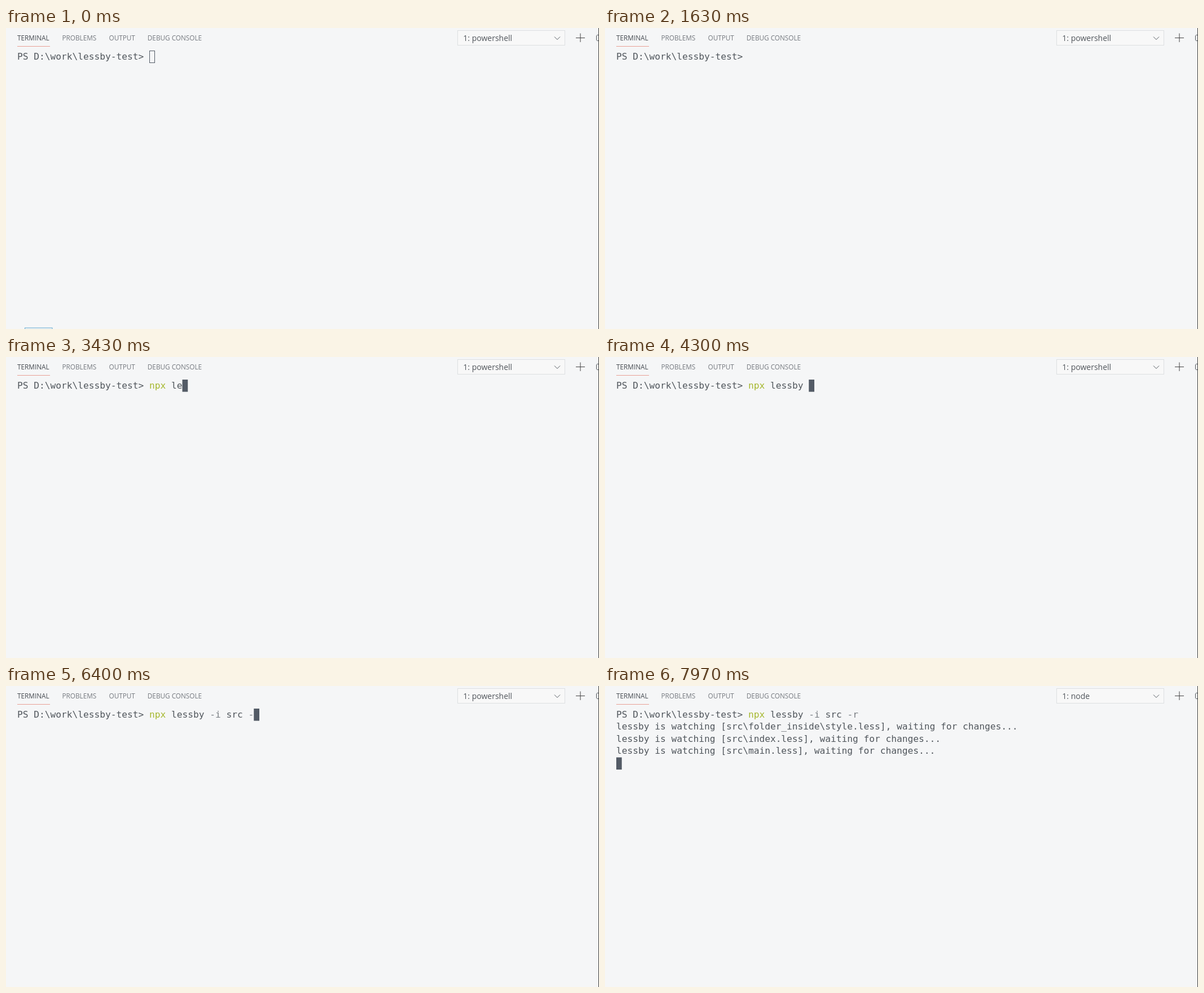
Recreate the animation shown at these times as an HTML page with a canvas. Size 1051 px wide and 533 px high, loop 8000 ms.

```html
<!DOCTYPE html>
<html lang="en">
<head>
<meta charset="utf-8">
<title>Terminal</title>
<style>
  html, body { margin: 0; width: 100%; height: 100%; overflow: hidden; background: #f5f6f7; }
  canvas { display: block; }
</style>
</head>
<body>
<canvas id="stage" width="1051" height="533"></canvas>
<script>
const ctx = document.getElementById('stage').getContext('2d');
const LOOP = 8000;
const MONO = '16.2px "DejaVu Sans Mono", monospace';
const tabFont = '11.75px "Open Sans", sans-serif';
const selectFont = '14px "Open Sans", sans-serif';
const COL = 9.75, ROW = 21.6, LEFT = 20, TOP = 40;
const BACK = '#f5f6f7', TEXT = '#50565c', MUTED = '#797e83', CURSOR = '#535b66', GREEN = '#a5b72c';

const PROMPT = 'PS D:\\work\\lessby-test> ';
const PARTS = [['npx', GREEN], [' lessby ', TEXT], ['-i', MUTED], [' src ', TEXT], ['-r', MUTED]];
// One time per typed character
const KEYS = [2300, 2830, 2980, 3120, 3250, 3380, 3530, 3740, 3940, 4110, 4270,
              4420, 4590, 4870, 5420, 5590, 5750, 6010, 6290, 6550];
const ENTER = 7120, RENAME = 7240, OUTPUT = 7760;
const FOCUS = 30, BLINK = 600;
const FILES = ['folder_inside\\style.less', 'index.less', 'main.less'];

function text(str, x, y, font, color) {
  ctx.font = font;
  ctx.fillStyle = color;
  ctx.fillText(str, x, y);
}

function cell(str, col, row, color) {
  text(str, LEFT + col * COL, Math.floor(56 + row * ROW), MONO, color);
}

function line(points, color, width) {
  ctx.beginPath();
  points.forEach(([x, y]) => ctx.lineTo(x, y));
  ctx.strokeStyle = color;
  ctx.lineWidth = width;
  ctx.stroke();
}

function box(x, y, w, h, color) {
  ctx.strokeStyle = color;
  ctx.lineWidth = 1;
  ctx.strokeRect(x, y, w, h);
}

function drawHeader(t) {
  text('TERMINAL', 20, 22, tabFont, '#454a50');
  text('PROBLEMS', 99.5, 22, tabFont, '#75797f');
  text('OUTPUT', 182.5, 22, tabFont, '#75797f');
  text('DEBUG CONSOLE', 250.8, 22, tabFont, '#75797f');
  line([[20, 32.5], [78, 32.5]], '#e9a095', 1);

  ctx.fillStyle = '#f8f8f8';
  ctx.fillRect(800, 4, 191, 27);
  box(800.5, 4.5, 190, 26, '#dddfe1');
  text(t < RENAME ? '1: powershell' : '1: node', 810.3, 23, selectFont, '#50555b');
  line([[972, 15.5], [977, 20.5], [982, 15.5]], '#555a60', 1);

  line([[1010, 17.5], [1026, 17.5]], '#424242', 1);
  line([[1018, 9.5], [1018, 25]], '#424242', 1);
  line([[1050, 12.5], [1047.5, 12.5], [1046.5, 13.5], [1046.5, 21.5], [1047.5, 22.5], [1050, 22.5]], '#555a60', 1);
}

function drawCursor(t, col, row) {
  const x = LEFT + col * COL, y = TOP + row * ROW;
  if (t < FOCUS) {
    box(Math.round(x) + 0.5, y + 0.5, 9, 21, CURSOR);
    return;
  }
  const on = t >= KEYS[0] || Math.floor((t - FOCUS) / BLINK) % 2 === 1;
  if (!on) return;
  ctx.fillStyle = CURSOR;
  ctx.fillRect(x, y, COL, ROW);
}

function drawTerminal(t) {
  const typed = KEYS.filter(k => k <= t).length;
  cell(PROMPT, 0, 0, TEXT);
  let start = 0;
  for (const [str, color] of PARTS) {
    cell(str.slice(0, Math.max(0, typed - start)), PROMPT.length + start, 0, color);
    start += str.length;
  }
  if (t >= OUTPUT) {
    FILES.forEach((file, i) =>
      cell(`lessby is watching [src\\${file}], waiting for changes...`, 0, i + 1, TEXT));
  }
  if (t < ENTER) drawCursor(t, PROMPT.length + typed, 0);
  else drawCursor(t, 0, t < OUTPUT ? 1 : FILES.length + 1);
}

function draw(t) {
  ctx.fillStyle = BACK;
  ctx.fillRect(0, 0, 1051, 533);
  drawHeader(t);
  drawTerminal(t);
  if (t < FOCUS) box(33.5, 531, 48.5, 10, '#62a9cf');
  ctx.fillStyle = '#3c3c3c';
  ctx.fillRect(1050, 0, 1, 533);
}

const began = performance.now();
function tick() {
  draw((performance.now() - began) % LOOP);
  requestAnimationFrame(tick);
}
tick();
</script>
</body>
</html>
```
